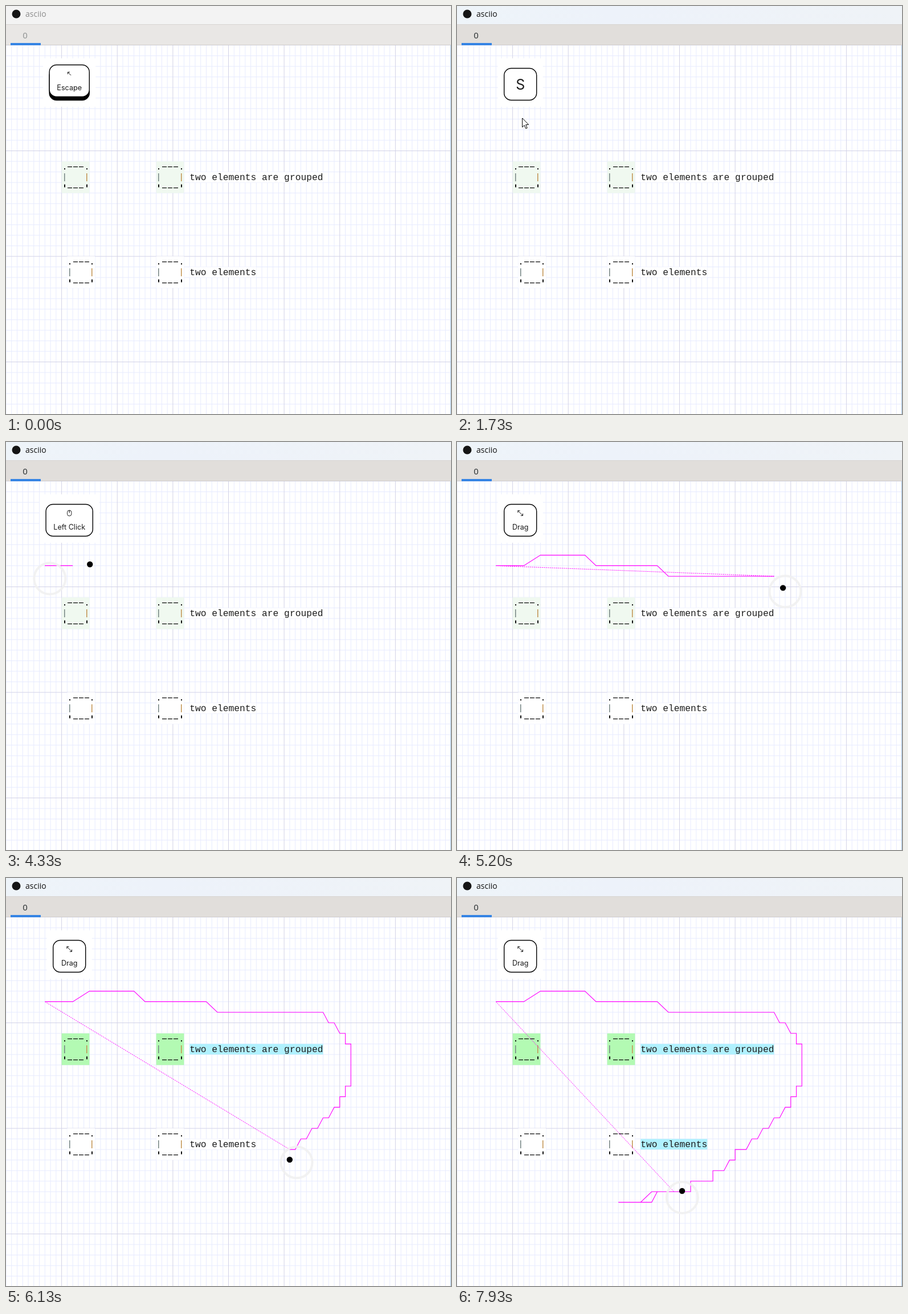
Animation, 781 px wide and 717 px high, one loop 8000 ms. Source, as an HTML page with a canvas:

```html
<!DOCTYPE html>
<html lang="en">
<head>
<meta charset="utf-8">
<title>asciio</title>
<style>
html, body { margin: 0; width: 100%; height: 100%; overflow: hidden; background: #fff; }
canvas { display: block; width: 781px; height: 717px; }
</style>
</head>
<body>
<canvas id="stage" width="781" height="717"></canvas>
<script>
const ctx = document.getElementById('stage').getContext('2d');
const W = 781, H = 717, LOOP = 8000, FPS = 15;
const CW = 9.763, CH = 18.55, TOP = 69;
const MONO = '16.27px "Liberation Mono", monospace';
const UI = 'Inter, sans-serif';
const PINK = '#ff00ff', GREEN = '#b3fab3', PALE = '#f0f9f0', CYAN = '#b0f1fe';

// Times at which things happen, in ms
const ENTER = 330, FOCUS = 465, PEN = 1860, CLICK = 4130, DRAW = 4200, DRAG = 4395;
const SAMPLE = 1000 / 30;

// Pointer key points: time, column, row
const pointer = [
  [ENTER, 0, 7.5], [1133, 11.75, 6.9], [3133, 11.7, 6.9], [3933, 7.05, 8.73], [DRAW, 7.05, 8.73],
  [4333, 15.06, 7.87], [4480, 24.5, 7.95], [4800, 44.5, 9.5], [5200, 58.6, 10.1],
  [5667, 62.3, 16.1], [6133, 51, 22.96], [6533, 44.4, 25.6],
  [7200, 29.4, 27.75], [7667, 29.4, 27.75], [LOOP, 41.75, 25.72]
];

const keys = [
  { from: 0, label: 'Escape', icon: 'corner', down: -500, up: -400 },
  { from: FOCUS, label: 'Left Click', icon: 'mouse', down: FOCUS, up: 667 },
  { from: 1260 },
  { from: 1725, label: 'S', down: 1725, up: 2100 },
  { from: 3130, label: 'X', down: 3265, up: 3335 },
  { from: 4060, label: 'Left Click', icon: 'mouse', down: 4060, up: LOOP },
  { from: DRAG, label: 'Drag', icon: 'drag', down: DRAG, up: LOOP }
];

const clamp = v => Math.max(0, Math.min(1, v));
const toPixel = ([c, r]) => [c * CW, TOP + r * CH];

// Smooth curve through the key points; it rests where two neighbours agree
function cellAt(t) {
  const i = Math.max(0, Math.min(pointer.length - 2, pointer.findLastIndex(k => k[0] <= t)));
  const a = pointer[i], b = pointer[i + 1], span = b[0] - a[0], f = clamp((t - a[0]) / span);
  const speed = (n, d) => {
    const p = pointer[n - 1], k = pointer[n], q = pointer[n + 1];
    const still = !p || !q || Math.abs(p[1] - k[1]) < 0.1 || Math.abs(k[1] - q[1]) < 0.1;
    return still || k[0] < DRAW ? 0 : (q[d] - p[d]) / (q[0] - p[0]);
  };
  const ease = f * f * (3 - 2 * f), g = 1 - f;
  return [1, 2].map(d => a[d] + (b[d] - a[d]) * ease +
    span * f * g * (g * speed(i, d) - f * speed(i + 1, d)));
}

const pointerAt = t => toPixel(cellAt(t));

// The lasso joins the corners of the cells the pen has visited
function lassoAt(t) {
  const points = [];
  for (let s = DRAW; s < t - 1; s += SAMPLE) points.push(toPixel(cellAt(s).map(Math.floor)));
  return points;
}

function rect(x, y, w, h, color) {
  ctx.fillStyle = color;
  ctx.fillRect(x, y, w, h);
}

function disc(x, y, r, color) {
  ctx.fillStyle = color;
  ctx.beginPath();
  ctx.arc(x, y, r, 0, 7);
  ctx.fill();
}

function line(points, color, width = 1, dash = []) {
  ctx.strokeStyle = color;
  ctx.lineWidth = width;
  ctx.setLineDash(dash);
  ctx.beginPath();
  points.forEach(([x, y]) => ctx.lineTo(x, y));
  ctx.stroke();
  ctx.setLineDash([]);
}

function text(str, x, y, font, color, align = 'left') {
  ctx.font = font;
  ctx.fillStyle = color;
  ctx.textAlign = align;
  ctx.fillText(str, x, y);
}

function drawGrid() {
  for (const major of [false, true]) {
    const color = major ? '#d2d2e7' : '#e7ebfe';
    const wanted = n => (n > 0 && n % 10 === 0) === major;
    for (let c = 0; c * CW < W; c++) {
      if (wanted(c)) line([[c * CW, TOP], [c * CW, H]], color);
    }
    for (let r = 0; TOP + r * CH < H; r++) {
      if (wanted(r)) line([[0, TOP + r * CH], [W, TOP + r * CH]], color);
    }
  }
  rect(780, TOP, 1, H - TOP, '#a3c4e4');
}

function drawWindow(active) {
  rect(0, 0, W, 32, '#f3f3f3');
  if (active) {
    const g = ctx.createLinearGradient(0, 0, W, 0);
    g.addColorStop(0, '#eef4f9');
    g.addColorStop(0.35, '#edf2fa');
    g.addColorStop(1, '#eff3f7');
    rect(0, 0, W, 32, g);
  }
  rect(0, 32, W, 37, active ? '#e1dedb' : '#e9e7e5');
  rect(0, 32, W, 1, '#d8d5d2');
  rect(0, 68, W, 1, '#d2cecb');
  rect(8, 65, 53, 4, '#3584e4');
  disc(18, 14, 7.5, '#151515');
  text('asciio', 34, 19, '14px "Open Sans", sans-serif', active ? '#111' : '#8c8c8c');
  text('0', 33.5, 56.5, '15px "Noto Sans", sans-serif', active ? '#2e3436' : '#929595', 'center');
}

function drawBox(col, row, fill) {
  const [x, y] = toPixel([col, row]);
  rect(x, y, 5 * CW, 3 * CH, fill);
  for (let i = 1; i < 4; i++) {
    for (const r of [0, 2]) rect(Math.round(x + i * CW + 1), Math.round(y + r * CH + 9), 8, 1.2, '#000');
  }
  for (const i of [0, 4]) {
    const cx = Math.round(x + (i + 0.5) * CW - 1);
    rect(cx, y + 12.2, 2, 2, '#000');
    rect(cx, y + 40.5, 2, 5, '#111');
    rect(cx, y + 21, 1.5, 14, i ? '#c1914f' : '#758482');
  }
}

function drawLabel(str, col, row, fill) {
  const [x, y] = toPixel([col, row]);
  rect(x, y, str.length * CW, CH, fill);
  text(str, x, y + 14, MONO, '#1c1c1c');
}

function drawElements(lasso) {
  // An element is picked once its lower left corner lies above the closing edge
  const start = lasso[0], tip = lasso.at(-1);
  const slope = lasso.length > 1 ? (tip[1] - start[1]) / (tip[0] - start[0]) : 0;
  const inside = (col, bottom) => {
    if (!start) return false;
    const [x, y] = toPixel([col, bottom]);
    return (y - start[1]) / (x - start[0]) <= slope;
  };
  const pick = (col, bottom) => inside(col, bottom) ? CYAN : '#fff';
  const group = inside(27, 14) ? GREEN : PALE;
  drawBox(10, 11, group);
  drawBox(27, 11, group);
  drawLabel('two elements are grouped', 33, 12, pick(33, 13));
  drawBox(11, 20, pick(11, 23));
  drawBox(27, 20, pick(27, 23));
  drawLabel('two elements', 33, 21, pick(33, 22));
}

function drawLasso(lasso) {
  if (lasso.length < 2) return;
  line(lasso, PINK, 1.1);
  line([lasso[0], lasso.at(-1)], PINK, 1, [2, 1.5]);
}

function drawIcon(kind, x, y) {
  if (kind === 'mouse') {
    ctx.strokeStyle = '#222';
    ctx.lineWidth = 1;
    ctx.beginPath();
    ctx.roundRect(x - 3.7, y - 5, 7.4, 10, 3.7);
    ctx.stroke();
    line([[x, y - 5], [x, y - 0.5]], '#222', 1.2);
    return;
  }
  const s = kind === 'drag' ? 4.3 : 2.8;
  const head = d => line([[x + d * s, y + d * (s - 3.6)], [x + d * s, y + d * s],
    [x + d * (s - 3.6), y + d * s]], '#111');
  line([[x - s, y - s], [x + s, y + s]], '#111');
  head(-1);
  if (kind === 'drag') head(1);
}

function drawKey(t) {
  const key = keys.findLast(k => k.from <= t);
  if (!key.label) return;
  const font = (key.icon ? 12.6 : 25) + 'px ' + UI;
  ctx.font = font;
  const w = Math.max(57, ctx.measureText(key.label).width + 26.5);
  const up = 6 * clamp(Math.max(key.down - t, t - key.up) / 130);
  const x = 111.2, base = 109.5, y = base - up;
  const cap = (top, fill) => {
    ctx.beginPath();
    ctx.roundRect(x - w / 2, top, w, 56, 12.5);
    ctx.fillStyle = fill;
    ctx.fill();
    ctx.strokeStyle = '#000';
    ctx.lineWidth = 1.4;
    ctx.stroke();
  };
  ctx.globalAlpha = t > 1195 && t < 1260 ? 0.5 : 1;
  rect(x - w / 2 - 11, 92, w + 22, 85, '#fff');
  if (up > 0) cap(base, '#000');
  cap(y, '#fff');
  if (key.icon) drawIcon(key.icon, x, y + 15.5);
  text(key.label, x, y + (key.icon ? 44 : 37), font, '#1a1a1a', 'center');
  ctx.globalAlpha = 1;
}

// The click ring trails slightly behind the pointer
function drawRing(t) {
  const click = t >= FOCUS && t < 790;
  if (!click && t < CLICK) return;
  const [x, y] = pointerAt(t >= CLICK && t < DRAG ? DRAW : t - 20);
  ctx.strokeStyle = 'rgba(241,241,241,.9)';
  ctx.lineWidth = 4;
  ctx.beginPath();
  ctx.arc(x + 8, y + 9, 27.5, 0, 7);
  ctx.stroke();
}

function drawArrow(x, y) {
  const shape = [[0, 0], [0, 16], [3.6, 12.6], [6.2, 18.4], [8.6, 17.3], [6.1, 11.7], [11, 11.4]];
  ctx.beginPath();
  shape.forEach(([dx, dy]) => ctx.lineTo(x + dx, y + dy));
  ctx.closePath();
  ctx.fillStyle = '#fff';
  ctx.fill();
  ctx.strokeStyle = '#000';
  ctx.lineWidth = 1;
  ctx.stroke();
}

function draw(t) {
  const lasso = lassoAt(t);
  rect(0, 0, W, H, '#fff');
  drawGrid();
  drawWindow(t >= FOCUS);
  drawElements(lasso);
  drawLasso(lasso);
  drawRing(t);
  drawKey(t);
  const [x, y] = pointerAt(t);
  if (t >= PEN) disc(x, y, 5.2, '#000');
  else if (t >= ENTER) drawArrow(x, y);
}

const begin = performance.now();
function tick() {
  const t = (performance.now() - begin) % LOOP;
  draw(Math.floor((t + 3.5) * FPS / 1000) * 1000 / FPS);
  requestAnimationFrame(tick);
}
tick();
</script>
</body>
</html>
```
